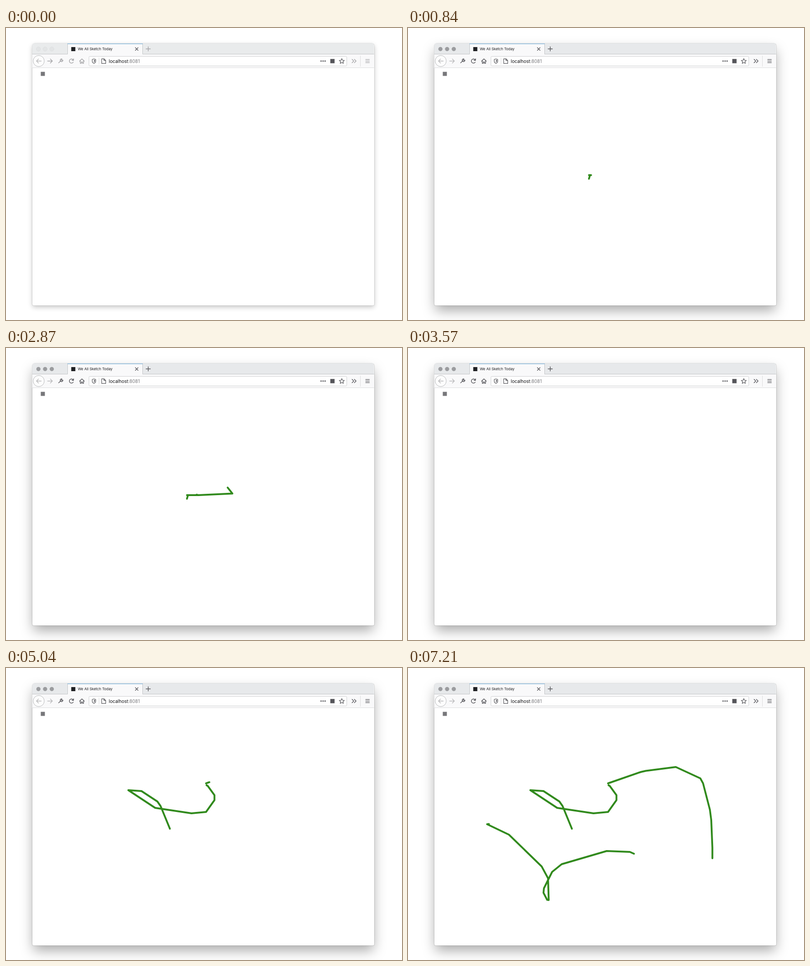
Animation, 871 px wide and 643 px high, one loop 7.28 s. Source, as an HTML page:

```html
<!DOCTYPE html>
<html lang="en">
<head>
<meta charset="utf-8">
<title>We All Sketch Today</title>
<style>
  html, body { margin: 0; width: 100%; height: 100%; overflow: hidden; background: #fff; }
  #stage { position: relative; width: 871px; height: 643px; overflow: hidden; }
  #window {
    position: absolute; left: 57.5px; top: 33.5px; width: 752px; height: 577px;
    border-radius: 5px 5px 3px 3px; background: #fff;
    box-shadow: 0 0 0 .5px rgba(0,0,0,.25), 0 13px 28px -2px rgba(0,0,0,.34);
  }
  .idle #window { box-shadow: 0 0 0 .5px rgba(0,0,0,.2), 0 4px 11px rgba(0,0,0,.22); }
  svg { position: absolute; left: 0; top: 0; display: block; }
  text { font-family: Inter, "Open Sans", sans-serif; }
  .line { fill: none; stroke: #55555a; stroke-width: 1.4; stroke-linecap: round; stroke-linejoin: round; }
  .fine { stroke-width: 1.2; }
  .faint { stroke: #b9b9bb; }
  .edge { fill: none; stroke: #c3c5c7; }
  .rule { fill: none; stroke: #dcddde; }
  .bar { fill: #e7e9eb; }
  .idle .bar { fill: #e9ebec; }
  .idle .tool { stroke: #a3a3a6; }
  #lights { fill: #9b9c9f; }
  .idle #lights { fill: #e3e5e6; stroke: #d9dadb; stroke-width: .7; }
  #ink { fill: none; stroke: #318a1d; stroke-width: 4; stroke-linecap: round; stroke-linejoin: round; }
</style>
</head>
<body>
<div id="stage" class="idle">
  <div id="window"></div>
  <svg width="871" height="643" viewBox="0 0 871 643">
    <!-- title bar and tab -->
    <path class="bar" d="M57.5 58V38.5a5 5 0 0 1 5-5H804.5a5 5 0 0 1 5 5V58Z"/>
    <path d="M57.5 58H809.5V88H57.5ZM135 34H300V58H135Z" fill="#f9f9fa"/>
    <path class="edge" d="M57.5 57.5H135.5V35M300.5 35V57.5H809.5"/>
    <path d="M135 34H301V35.5H135Z" fill="#90bedf"/>
    <path class="rule" d="M57.5 87.5H809.5"/>
    <g id="lights"></g>
    <rect x="143.5" y="42" width="9" height="9" fill="#1f2023"/>
    <text x="158" y="49" font-size="7.9" fill="#1b1b1f">We All Sketch Today</text>
    <path class="line" d="M284.5 43.2l6 6m0-6l-6 6"/>
    <path class="line tool" d="M308 46h9.6M312.8 41.2v9.6"/>

    <!-- navigation -->
    <circle cx="72" cy="72.7" r="12.2" fill="#fdfdfd" stroke="#b7b8ba"/>
    <path class="line faint" d="M77.5 72.7H67m4.5-4.5l-4.5 4.5l4.5 4.5"/>
    <path class="line faint tool" d="M91.5 72.7H102m-4.5-4.5l4.5 4.5l-4.5 4.5"/>
    <path class="line tool" d="M115.8 76.8l4.8-4.8M123.2 68.2A3 3 0 1 0 125.2 70.6L122.6 71.2L121.8 70.2Z"/>
    <path class="line tool" d="M147.6 70A4.6 4.6 0 1 0 148 75M148.6 67.8V71.2H145"/>
    <path class="line tool" d="M161.8 73L167 68L172.2 73M163.4 72.5V77.8H165.8V74.6H168.2V77.8H170.6V72.5"/>

    <!-- address field -->
    <rect x="182.5" y="62.5" width="567" height="21" rx="2" fill="#fff" stroke="#cfd0d2"/>
    <path class="rule" d="M204.5 65V81M779.5 61V85"/>
    <path class="line fine" d="M193.5 68l3.9 1.2v3.3q0 4-3.9 5.5q-3.9-1.5-3.9-5.5v-3.3Z"/>
    <path d="M193.5 70v5.8q2.2-1.2 2.2-3.6v-1.6Z" fill="#55555a"/>
    <path class="line fine" d="M210.5 67.8h5l3.9 3.6v6.8h-8.9Zm4.9.2v3.6h3.8"/>
    <text x="226" y="76.8" font-size="10" fill="#111114">localhost<tspan fill="#77777b">:8081</tspan></text>
    <g id="dots" fill="#55555a"></g>
    <rect x="713.3" y="68.2" width="9.4" height="9.4" fill="#55555a"/>
    <path id="star" class="line fine"/>
    <path class="line tool" d="M761.2 69l3.8 3.8l-3.8 3.8M766.2 69l3.8 3.8l-3.8 3.8"/>
    <path class="line fine tool" d="M791 69.3h8.4m0 3.5h-8.4m0 3.5h8.4"/>

    <!-- page -->
    <rect x="76.5" y="96.5" width="9" height="9" fill="#77777a"/>
    <g id="ink"></g>
  </svg>
</div>
<script>
const LOOP = 7280, STEP = 70, ACTIVE = 350, CLEAR = 3570;
const LEAD = 0.08; // part of a step already drawn when a stroke begins
const byId = id => document.getElementById(id);

function add(parent, tag, attrs) {
  const node = document.createElementNS('http://www.w3.org/2000/svg', tag);
  for (const key in attrs) node.setAttribute(key, attrs[key]);
  return byId(parent).appendChild(node);
}

// n points on an arc, with the radius given per point
const arc = (n, cx, cy, rx, ry, from, turn, scale = () => 1) =>
  Array.from({ length: n }, (_, i) => {
    const a = from + turn * i / n;
    return [cx + rx * scale(i) * Math.cos(a), cy + ry * scale(i) * Math.sin(a)].map(v => v.toFixed(1));
  }).join(' ');

for (let i = 0; i < 3; i++) {
  add('lights', 'circle', { cx: 71.3 + 14.7 * i, cy: 46.3, r: 4.6 });
  add('dots', 'circle', { cx: 693 + 4.4 * i, cy: 72.8, r: 1.5 });
}
const star = arc(10, 738.6, 73.2, 5.9, 5.9, -Math.PI / 2, 2 * Math.PI, i => i % 2 ? 0.46 : 1);
byId('star').setAttribute('d', `M${star}Z`);

// a pen stroke that grows evenly from one time to another
function stroke(from, to, end, points) {
  const node = add('ink', 'polyline', { points, pathLength: 1 });
  return t => {
    const progress = (t - from + LEAD * STEP) / (to - from + LEAD * STEP);
    node.style.display = t >= from && t < end ? '' : 'none';
    node.style.strokeDasharray = `${Math.max(0, Math.min(1, progress))} 2`;
  };
}

const strokes = [
  stroke(560, 1330, CLEAR, '398,332 400,325 398,324 423,324 419,323'),
  stroke(2730, 3360, CLEAR, '423,324 ' + arc(11, 420.5, 320.5, 77.5, 28.5, 0, -2 * Math.PI)),
  stroke(4060, 4410, LOOP,
    '441,258 444,260 458.5,280 458.5,291 440,317 408,320 328,308 269,269 298,271 333,294 340,304 360.5,354'),
  stroke(5040, 5320, LOOP,
    '440,254 512,229 523,226.5 589,218 643,243 649,254 664,312 667,335 669.5,396 669.5,419'),
  stroke(5950, 6370, LOOP,
    '497,409 488,405 437,403 338,432 317,449 299,485 298,495 306,510.5 309.5,511 308,463 294,437 222,367 174,344 178,343.5')
];

function draw(time) {
  const t = Math.floor(time / STEP) * STEP;
  byId('stage').className = t < ACTIVE ? 'idle' : '';
  strokes.forEach(update => update(t));
}

const start = performance.now();
function tick() {
  draw((performance.now() - start) % LOOP);
  requestAnimationFrame(tick);
}
tick();
</script>
</body>
</html>
```
